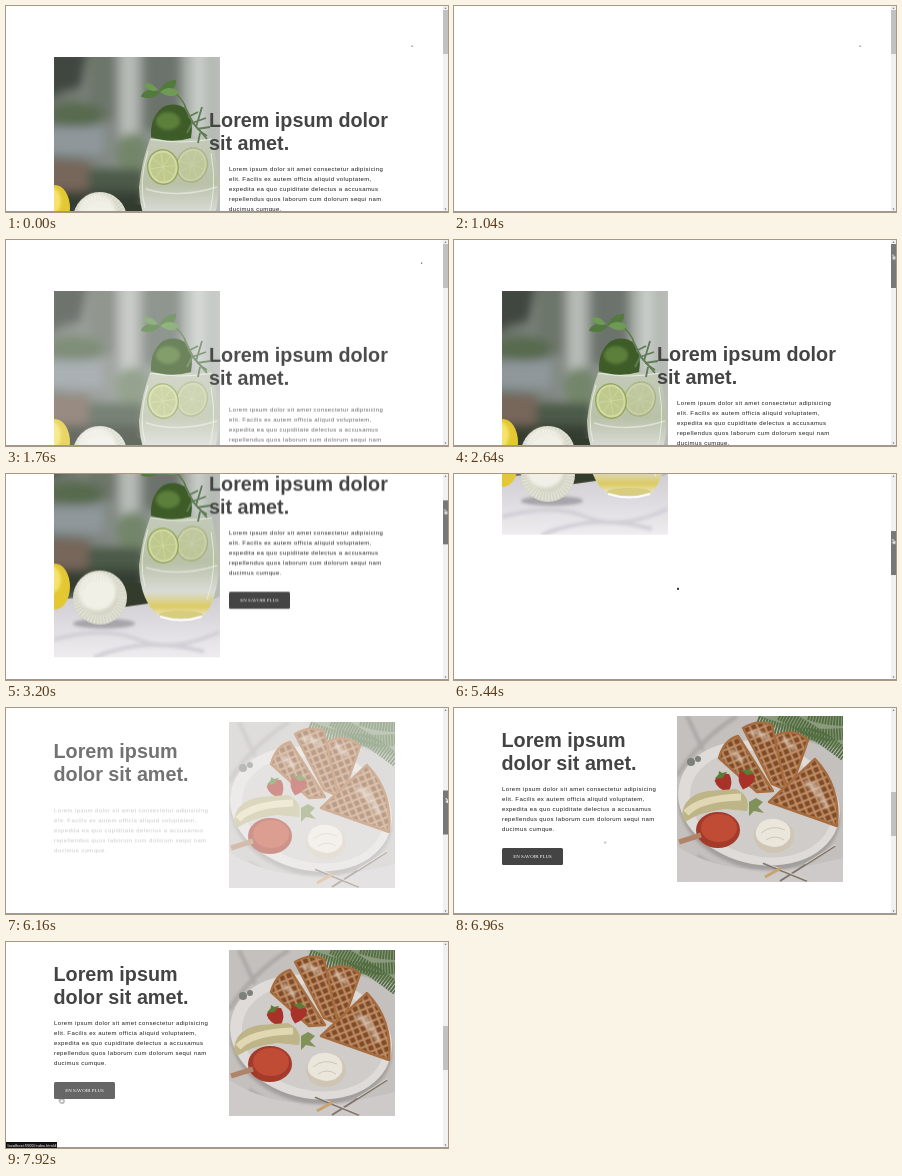
An HTML page for the animation above (8000 ms loop, 442x206 px).

```html
<!DOCTYPE html>
<html lang="fr">
<head>
<meta charset="utf-8">
<title>Lorem ipsum</title>
<style>
@property --scroll { syntax: "<number>"; inherits: true; initial-value: 0; }
html, body { margin: 0; width: 100%; height: 100%; overflow: hidden; background: #fff; }
svg.stage { display: block; width: 100%; height: 100%; animation: scroll 8s linear infinite; }

.page { transform: translateY(calc(var(--scroll) * -1px)); }
.drift { transform: translateY(calc(var(--scroll) * -.165px)); }
.thumb { transform: translateY(calc(var(--scroll) * .25px)); animation: press 8s step-end infinite; }

/* --at is the moment an item starts to appear */
.rise, .appear { animation: rise 8s linear infinite; animation-delay: calc(var(--at) - 8s); }
.appear { animation-name: appear; }
.first { animation: leave 8s linear infinite; }
.second { animation: second 8s step-end infinite; }
.spot { animation: spot 8s step-end infinite; }
.hover1 { animation: hover1 8s linear infinite; }
.hover2 { animation: hover2 8s linear infinite; }
.cursor { animation: move 8s ease-in-out infinite; }
.hand, .status { animation: over 8s step-end infinite; }
.arrow { animation: off 8s step-end infinite; }

.title { font: bold 19.75px "Liberation Sans", Arial, sans-serif; fill: #444; }
.body { font: 6px "Liberation Sans", Arial, sans-serif; letter-spacing: .39px; fill: #1c1c1c; }
.label { font: 4.9px "Liberation Serif", serif; fill: #fff; text-anchor: middle; }
.status text { font: 4px Roboto, sans-serif; fill: #fff; }

@keyframes scroll {
  0%, 33.75% { --scroll: 0; }
  37% { --scroll: 74; }
  45%, 64% { --scroll: 115; }
  68% { --scroll: 212; }
  73% { --scroll: 290; }
  77% { --scroll: 314; }
  80%, 100% { --scroll: 320; }
}
@keyframes rise {
  0% { opacity: 0; transform: translateY(20px); animation-timing-function: cubic-bezier(.5, 1, .89, 1); }
  8.1%, 90% { opacity: 1; transform: none; }
  90.01%, 100% { opacity: 0; transform: translateY(20px); }
}
@keyframes appear {
  0% { opacity: 0; animation-timing-function: cubic-bezier(.5, 1, .89, 1); }
  12.5%, 90% { opacity: 1; }
  90.01%, 100% { opacity: 0; }
}
@keyframes leave {
  0%, 1% { opacity: 1; animation-timing-function: ease-out; }
  7%, 13.75% { opacity: 0; }
  13.76%, 100% { opacity: 1; }
}
@keyframes second { 0% { opacity: 0; } 72% { opacity: 1; } 100% { opacity: 1; } }
@keyframes spot { 0% { opacity: 0; } 67% { opacity: 1; } 69.5%, 100% { opacity: 0; } }
@keyframes press {
  0% { fill: #c1c1c1; } 27% { fill: #a8a8a8; } 32% { fill: #787878; }
  48.5% { fill: #c1c1c1; } 64% { fill: #787878; } 81.5%, 100% { fill: #c1c1c1; }
}
@keyframes hover1 { 0%, 51% { fill: #444; } 53%, 60% { fill: #666; } 62%, 100% { fill: #444; } }
@keyframes hover2 { 0%, 93% { fill: #444; } 96%, 100% { fill: #666; } }
@keyframes over { 0% { opacity: 0; } 52% { opacity: 1; } 60.5% { opacity: 0; } 93.5%, 100% { opacity: 1; } }
@keyframes off { 0% { opacity: 1; } 52% { opacity: 0; } 60.5% { opacity: 1; } 93.5%, 100% { opacity: 0; } }
@keyframes move {
  0%, 16% { transform: translate(405.5px, 38px); animation-timing-function: linear; }
  22% { transform: translate(415px, 21px); }
  27%, 33.75% { transform: translate(438.5px, 14.5px); animation-timing-function: linear; }
  37% { transform: translate(438.5px, 32px); animation-timing-function: linear; }
  45%, 49% { transform: translate(438.5px, 41px); }
  52.5%, 60% { transform: translate(242px, 98px); }
  63.5%, 64% { transform: translate(438.5px, 41px); animation-timing-function: linear; }
  68% { transform: translate(438.5px, 65px); animation-timing-function: linear; }
  73% { transform: translate(439.5px, 84px); animation-timing-function: linear; }
  77% { transform: translate(440px, 90px); }
  80%, 82% { transform: translate(440px, 92px); }
  90% { transform: translate(32px, 149px); }
  94%, 100% { transform: translate(53.5px, 154.5px); }
}
</style>
</head>
<body>
<svg class="stage" viewBox="0 0 442 206" preserveAspectRatio="none">
  <defs>
    <clipPath id="tall"><rect width="166" height="221.3"/></clipPath>
    <clipPath id="square"><rect width="166" height="166"/></clipPath>
    <filter id="soft" x="-30%" y="-30%" width="160%" height="160%"><feGaussianBlur stdDeviation="5"/></filter>
    <filter id="haze" x="-30%" y="-30%" width="160%" height="160%"><feGaussianBlur stdDeviation="1.6"/></filter>
    <linearGradient id="wall">
      <stop stop-color="#6a7268"/><stop offset=".35" stop-color="#858b86"/>
      <stop offset=".6" stop-color="#8f958f"/><stop offset="1" stop-color="#b9beb9"/>
    </linearGradient>
    <linearGradient id="drink" x2="0" y2="1">
      <stop stop-color="#c3cab8"/><stop offset=".45" stop-color="#b9c1a8"/>
      <stop offset=".75" stop-color="#d9dcd7"/><stop offset=".9" stop-color="#dccb62"/><stop offset="1" stop-color="#eee9cf"/>
    </linearGradient>
    <linearGradient id="cloth" x2="0" y2="1"><stop stop-color="#cfcdd2"/><stop offset="1" stop-color="#efedf0"/></linearGradient>
    <pattern id="grid" width="7" height="7" patternUnits="userSpaceOnUse" patternTransform="rotate(-22)">
      <rect width="7" height="7" fill="#c08f66"/><rect x="1.5" y="1.5" width="5" height="5" fill="#7f4a28"/>
    </pattern>
    <g id="slice">
      <ellipse rx="16" ry="18" fill="#93a550"/><ellipse rx="14.5" ry="16.5" fill="#d6dcab"/>
      <ellipse rx="12.5" ry="14.5" fill="#c0ca88"/>
      <path d="M-12 0H12M0-14V14M-9-10L9 10M9-10L-9 10" stroke="#d4dba8" stroke-width=".7"/>
    </g>
    <path id="leaf" d="M0 0Q5-10 18-8Q16 3 0 0Z"/>
    <g id="berry">
      <path d="M-8-5Q0-12 8-5Q9 4 0 11Q-9 4-8-5Z" fill="#a8322a"/>
      <path d="M-7-7L0-4 7-8 2-9 0-12-2-9Z" fill="#5d7c35"/>
    </g>
    <text id="copy" class="body">
      <tspan x="0" y="0">Lorem ipsum dolor sit amet consectetur adipisicing</tspan>
      <tspan x="0" y="10">elit. Facilis ex autem officia aliquid voluptatem,</tspan>
      <tspan x="0" y="20">expedita ea quo cupiditate delectus a accusamus</tspan>
      <tspan x="0" y="30">repellendus quos laborum cum dolorum sequi nam</tspan>
      <tspan x="0" y="40">ducimus cumque.</tspan>
    </text>
    <g id="button">
      <rect width="61" height="17" rx="1.5"/>
      <text class="label" x="30.5" y="10.2">EN SAVOIR PLUS</text>
    </g>

    <g id="lemonade" clip-path="url(#tall)">
      <rect width="166" height="222" fill="url(#wall)"/>
      <g filter="url(#soft)">
        <path d="M-8-8H34L26 30 8 34-8 42Z" fill="#3f473f"/>
        <path d="M34-8H60V64H34Z" fill="#6d766b"/>
        <path d="M66-8H84V84H66Z" fill="#b7bcb7"/>
        <path d="M90-8H126V74H90Z" fill="#6c736c"/>
        <path d="M138-8H152V84H138Z" fill="#c9cdc9"/>
        <path d="M-8 70H50V98H-8Z" fill="#8f979b"/>
        <ellipse cx="22" cy="58" rx="28" ry="12" fill="#566b4d"/>
        <ellipse cx="78" cy="96" rx="16" ry="20" fill="#73866a"/>
        <path d="M-8 104H34V136H-8Z" fill="#77665a"/>
        <path d="M34 112H90V158H34Z" fill="#4c5a48"/>
        <path d="M-8 134H90V160H-8Z" fill="#343d33"/>
      </g>
      <path d="M-2 165Q40 158 90 166T168 160V224H-2Z" fill="url(#cloth)"/>
      <path d="M60 152Q75 142 92 150L94 168 66 172Z" fill="#333c2c"/>
      <path d="M0 204Q50 190 84 204T166 196M40 222Q90 200 150 216" fill="none" stroke="#d2d0d7" stroke-width="4" filter="url(#haze)"/>
      <ellipse cx="50" cy="188" rx="31" ry="5" fill="#a7a4ab" filter="url(#haze)"/>
      <ellipse cx="1" cy="151" rx="15" ry="23" fill="#e3c833"/>
      <ellipse cx="-2" cy="144" rx="9" ry="13" fill="#f5e36d" filter="url(#haze)"/>
      <circle cx="46" cy="162" r="27" fill="#d5d6c7"/>
      <circle cx="43" cy="156" r="19" fill="#f0f0e7" filter="url(#haze)"/>
      <circle cx="46" cy="162" r="22" fill="none" stroke="#e6e6da" stroke-width="9" stroke-dasharray="1 2"/>
      <path d="M96 82H158Q163 103 165 126Q164 168 148 181H106Q86 167 85 130Q88 103 96 82Z" fill="url(#drink)"/>
      <use href="#slice" transform="translate(138 108) rotate(18)" opacity=".5"/>
      <use href="#slice" transform="translate(109 110) rotate(-8)" opacity=".9"/>
      <path d="M92 132Q125 142 163 130" fill="none" stroke="#e9ece4" stroke-width="1.5" opacity=".7"/>
      <path d="M96 82Q127 88 158 82M94 94Q84 125 91 151M157 96Q164 133 153 164" fill="none" stroke="#edf1e8" opacity=".8"/>
      <ellipse cx="127" cy="179" rx="22" ry="4" fill="#d8cd7f"/>
      <path d="M106 181Q127 188 148 181" fill="none" stroke="#fff" stroke-width="2"/>
      <path d="M97 80Q96 60 109 50Q122 44 133 53Q140 64 137 81Q117 87 97 80Z" fill="#3d5c28"/>
      <ellipse cx="114" cy="64" rx="12" ry="9" fill="#5c7f3b" filter="url(#haze)"/>
      <path d="M115 31Q130 42 132 52Q139 71 153 79" fill="none" stroke="#577b3e" stroke-width="1.5"/>
      <g fill="#517a3c">
        <use href="#leaf" transform="translate(106 35) rotate(190)"/>
        <use href="#leaf" transform="translate(105 36) rotate(-14) scale(1.1)"/>
        <use href="#leaf" transform="translate(106 35) rotate(22)" fill="#6f9a56"/>
        <use href="#leaf" transform="translate(104 33) rotate(222) scale(.8)" fill="#6f9a56"/>
      </g>
      <path d="M131 50L139 66 153 82M134 60L144 55M138 66L152 61M143 72L156 70M138 66L133 76M146 76L144 86M148 50L142 70" fill="none" stroke="#607c55" stroke-width="1.8"/>
    </g>

    <g id="waffles" clip-path="url(#square)">
      <rect width="166" height="166" fill="#c3c0be"/>
      <path d="M0 60Q22 24 60 0M0 152Q60 150 92 168M20 140L60 166M10 0L26 34" fill="none" stroke="#aba7a5" stroke-width="4" filter="url(#haze)"/>
      <path d="M0 130Q60 170 166 142V166H0Z" fill="#cdcac9"/>
      <ellipse cx="82" cy="92" rx="82" ry="61" fill="#a19e9c" transform="rotate(14 82 92)" filter="url(#haze)"/>
      <ellipse cx="82" cy="87" rx="82" ry="61" fill="#dedbd8" transform="rotate(14 82 87)"/>
      <ellipse cx="84" cy="88" rx="72" ry="52" fill="#cfccc9" transform="rotate(14 84 88)"/>
      <path d="M78-2Q118 24 168 34V-2Z" fill="#8b9a7c" filter="url(#haze)"/>
      <g fill="none" stroke="#526d41" stroke-width="5" stroke-dasharray="1.8 1">
        <path d="M80 5Q120 22 166 18" stroke-width="12"/><path d="M103-2Q133 12 168 39" stroke-width="13"/>
        <path d="M132-2Q150 4 168 4" stroke-width="12"/>
      </g>
      <g fill="url(#grid)" stroke="#a86d3f" stroke-width="2.4" stroke-linejoin="round">
        <path d="M91 25Q112 8 131 24L112 78Z"/>
        <path d="M66 12Q80 3 95 9L109 74 95 68Z"/>
        <path d="M42 42Q47 24 61 20L96 75 80 76Z"/>
        <path d="M92 86L138 43Q164 70 160 110Z"/>
      </g>
      <path d="M73 18Q84 14 91 24M106 22L118 34M128 65L145 82M54 34L66 46M136 66L150 92" stroke="#e9dfd4" stroke-width="5" fill="none" opacity=".55" filter="url(#haze)"/>
      <use href="#berry" transform="translate(47 66) rotate(-24)"/>
      <use href="#berry" transform="translate(69 63) rotate(16)"/>
      <path d="M5 100Q6 79 31 75L59 73Q74 80 70 95L48 93Q22 96 8 106Z" fill="#bdb487"/>
      <path d="M9 97Q23 82 64 81" fill="none" stroke="#dfd8b2" stroke-width="7"/>
      <path d="M72 86L79 82 86 86 81 91 87 97 77 95 72 100Z" fill="#819159"/>
      <ellipse cx="41" cy="114" rx="22" ry="18" fill="#a43a2a"/>
      <ellipse cx="42" cy="112" rx="18" ry="14" fill="#c04c36"/>
      <path d="M24 119L2 126" stroke="#b08468" stroke-width="5"/>
      <ellipse cx="97" cy="120" rx="20" ry="17" fill="#cfc5b4"/>
      <path d="M79 114Q84 101 99 103Q116 106 113 122Q105 135 89 129Q77 125 79 114Z" fill="#ebe6dc"/>
      <path d="M84 117Q95 108 108 114M89 124Q98 118 107 124" fill="none" stroke="#cec7b6"/>
      <path d="M86 147L130 165M103 165L158 130" stroke="#80756a" stroke-width="2"/>
      <path d="M86 146L130 164M128 148L158 129" stroke="#ece7df" stroke-width=".8"/>
      <path d="M88 161L104 152" stroke="#c9a36f" stroke-width="3"/>
      <g fill="#7d807a"><circle cx="14" cy="46" r="4"/><circle cx="21" cy="43" r="3"/></g>
    </g>
  </defs>

  <rect width="442" height="206" fill="#fff"/>

  <g class="page">
    <g class="first">
      <g class="appear" style="--at: 1.25s"><use href="#lemonade" x="48" y="51"/></g>
      <g class="drift">
        <g class="rise title" style="--at: 1.25s">
          <text x="203" y="121.3">Lorem ipsum dolor</text>
          <text x="203" y="144">sit amet.</text>
        </g>
        <g class="rise" style="--at: 1.485s"><use href="#copy" x="223" y="165"/></g>
        <g class="rise" style="--at: 1.6s"><g class="hover1"><use href="#button" x="223" y="222"/></g></g>
      </g>
    </g>
    <rect class="spot" x="223" y="326" width="2" height="2" fill="#333"/>
    <g class="second">
      <g class="appear" style="--at: 5.835s"><use href="#waffles" x="223" y="328"/></g>
      <g class="rise title" style="--at: 5.835s">
        <text x="47.5" y="359">Lorem ipsum</text>
        <text x="47.5" y="382">dolor sit amet.</text>
      </g>
      <g class="rise" style="--at: 6.08s"><use href="#copy" x="48" y="403"/></g>
      <g class="rise" style="--at: 6.28s"><g class="hover2"><use href="#button" x="48" y="460"/></g></g>
    </g>
  </g>

  <rect x="437" width="5" height="206" fill="#f1f1f1"/>
  <path d="M438.5 2.7L439.5 1.3 440.5 2.7ZM438.5 202.5L439.5 204 440.5 202.5Z" fill="#666"/>
  <rect class="thumb" x="437" y="4" width="5" height="44"/>
  <rect y="205" width="442" height="1" fill="#999"/>
  <g class="status">
    <rect y="200" width="51" height="6" fill="#111"/>
    <text x="1.5" y="204.5">localhost:5500/index.html#</text>
  </g>

  <g class="cursor" fill="#fff" stroke-linejoin="round">
    <g class="arrow">
      <path d="M0 0V4.6L1.1 3.6 1.8 5.1 2.5 4.8 1.8 3.3H3.2Z" stroke="#fff" stroke-width=".4"/>
      <rect x=".2" y="1.5" width="1" height="1.4" fill="#555"/>
    </g>
    <path class="hand" d="M.8 3.6V.6Q1.3-.2 1.8.6V2.4L4.2 3Q4.7 3.3 4.5 4.6L4 6.6H1.4L-.5 4Q-.2 3.2.8 3.6Z" stroke="#222" stroke-width=".6"/>
  </g>
</svg>
</body>
</html>
```
